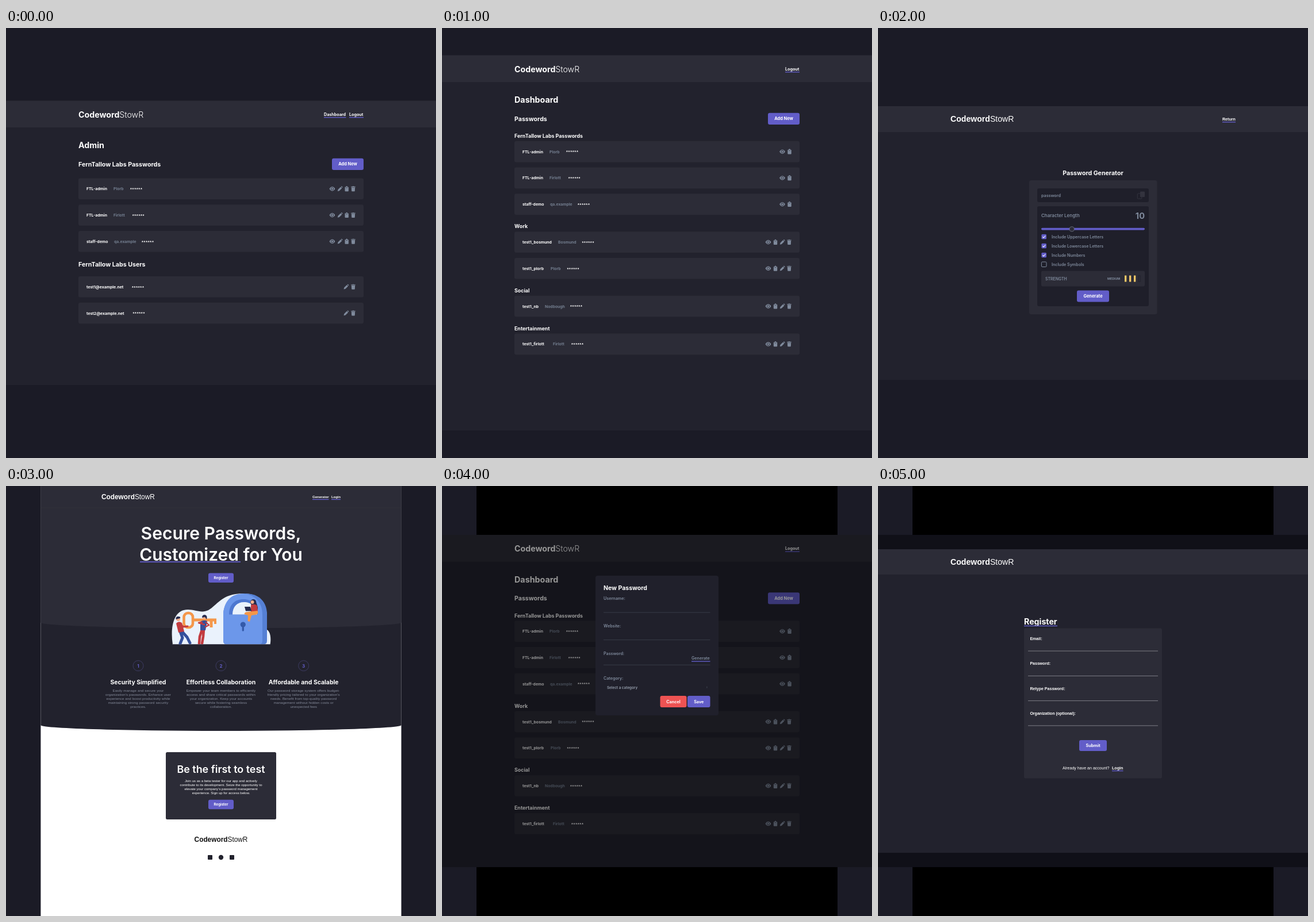
An HTML page for the animation above (6000 ms loop, 748 by 748 pixels).

```html
<!DOCTYPE html>
<html lang="en">
<head>
<meta charset="utf-8">
<title>Password manager tour</title>
<style>
  html, body { margin: 0; width: 100%; height: 100%; overflow: hidden; background: #1b1b26; }
  svg { display: block; width: 100%; height: 100%; }
  text { font-family: Inter, "Open Sans", sans-serif; font-weight: 700; fill: #fff; white-space: pre; }
  .arial { font-family: "Liberation Sans", Arial, sans-serif; }
  .thin { font-weight: 300; }
  .plain { font-weight: 400; }
  .semi { font-weight: 600; }
  .mid { text-anchor: middle; }
  .end { text-anchor: end; }
  .stars { letter-spacing: .7px; }
</style>
</head>
<body>
<svg id="stage" viewBox="0 0 748 748"></svg>
<script>
const OUTER = '#1b1b26', PAGE = '#22222d', PANEL = '#2c2c37', INSET = '#1f1f2a';
const PURPLE = '#625dc8', GRAY = '#7f8a9c';
const SCENE_MS = 1000;
const ORG = 'FernTallow Labs';

const rect = (x, y, w, h, fill, r = 0, extra = '') =>
  `<rect x="${x}" y="${y}" width="${w}" height="${h}" rx="${r}" fill="${fill}" ${extra}/>`;
const circle = (x, y, r, fill, extra = '') =>
  `<circle cx="${x}" cy="${y}" r="${r}" fill="${fill}" ${extra}/>`;
const path = (d, fill, extra = '') => `<path d="${d}" fill="${fill}" ${extra}/>`;
const text = (x, y, size, str, cls = '', fill = '#fff') =>
  `<text x="${x}" y="${y}" font-size="${size}" class="${cls}" style="fill:${fill}">${str}</text>`;
const move = (x, y, body) => `<g transform="translate(${x} ${y})">${body}</g>`;
const hline = (x1, x2, y, color, w = 1) => rect(x1, y - w / 2, x2 - x1, w, color);
const lines = (x, y, step, size, rows, cls, fill) =>
  rows.map((s, i) => text(x, y + i * step, size, s, cls, fill)).join('');

const logo = (x, y, size, cls = '', fill = '#fff') =>
  text(x, y, size, `Codeword<tspan class="${cls.includes('arial') ? 'plain' : 'thin'}">StowR</tspan>`, cls, fill);

function button(x, y, w, h, label, size = 7.4, fill = PURPLE) {
  return rect(x, y, w, h, fill, 3) + text(x + w / 2, y + h / 2 + size * 0.36, size, label, 'mid');
}

function link(x, w, y, label, size, cls = '', gap = 3) {
  return text(x, y, size, label, cls) + hline(x, x + w, y + gap, PURPLE, 1.4);
}

function page(top, headH, end) {
  return rect(0, top, 748, end - top, PAGE) + rect(0, top, 748, headH, PANEL);
}

const icons = {
  eye: path('M-4.9 0C-3.5-2.6-1.8-3.7 0-3.7S3.5-2.6 4.9 0C3.5 2.6 1.8 3.7 0 3.7S-3.5 2.6-4.9 0Z', GRAY) +
    circle(0, 0, 2.5, PANEL) + circle(0, 0, 1.7, GRAY),
  pen: path('M-4.2 4.2L-3.5 1.2 1.1-3.4 3.4-1.1-1.2 3.5ZM1.7-4L2.5-4.5Q3.1-4.7 3.6-4.2L4.2-3.6Q4.7-3.1 4.5-2.5L4-1.7Z', GRAY),
  clip: rect(-3.2, -3.3, 6.4, 7.7, GRAY, 1) + circle(0, -3.4, 1.4, GRAY) + rect(-1.6, -2.2, 3.2, 0.6, PANEL),
  bin: rect(-3.8, -4.1, 7.6, 1.2, GRAY, 0.4) + rect(-1.3, -4.6, 2.6, 1, GRAY) +
    path('M-3.2-2.4H3.2L2.8 3.7Q2.7 4.4 2 4.4H-2Q-2.7 4.4-2.8 3.7Z', GRAY)
};

// One credentials row; set holds pairs such as "eye 567.5"
function row(y, user, site, siteX, starX, set) {
  return rect(126, y - 18.3, 496, 36.6, PANEL, 3) +
    text(140, y + 2.5, 6.85, user) +
    (site ? text(siteX, y + 2.5, 6.8, site, '', '#747f90') : '') +
    text(starX, y + 3.2, 7.4, '******', 'arial stars') +
    set.map(s => s.split(' ')).map(([name, x]) => move(x, y, icons[name])).join('');
}

const shared = [['FTL-admin', 'Plorb', 187, 216], ['FTL-admin', 'Firlott', 187, 219.7], ['staff-demo', 'qa.example', 188, 236]];
const viewSet = ['eye 592', 'clip 604.5'];
const ownSet = ['eye 567.5', 'clip 580', 'pen 592', 'bin 604'];
const adminSet = ['eye 567.5', 'pen 581', 'clip 592.7', 'bin 604'];

function admin() {
  return page(126.5, 46.5, 621) + logo(126, 155.5, 14.2) +
    link(553, 38.5, 152.6, 'Dashboard', 7.15) + link(597, 25, 152.6, 'Logout', 7.15) +
    text(126, 209.3, 14.2, 'Admin') +
    text(126, 241, 10.65, ORG + ' Passwords') + button(567, 226.7, 55, 20.2, 'Add New') +
    shared.map((r, i) => row(279.8 + i * 45.75, ...r, adminSet)).join('') +
    text(126, 414.8, 10.65, ORG + ' Users') +
    row(450.3, 'test1@example.net', '', 0, 219, ['pen 591.7', 'bin 604']) +
    row(496, 'test2@example.net', '', 0, 220.5, ['pen 591.7', 'bin 604']);
}

function dashboard(top, end) {
  return page(top, 46.5, end) + move(0, top,
    logo(126, 29, 14.2) + link(597, 25, 26.1, 'Logout', 7.15) +
    text(126, 82.8, 14.3, 'Dashboard') +
    text(126, 114.4, 10.6, 'Passwords') + button(567, 100.2, 55, 20.2, 'Add New') +
    text(126, 143.6, 8.85, ORG + ' Passwords') +
    shared.map((r, i) => row(167.6 + i * 45.75, ...r, viewSet)).join('') +
    text(126, 300.8, 8.85, 'Work') +
    row(325, 'test1_bosmund', 'Bosmund', 202, 243.5, ownSet) +
    row(370.8, 'test1_plorb', 'Plorb', 189, 217.5, ownSet) +
    text(126, 412.3, 8.85, 'Social') +
    row(436.5, 'test1_nb', 'Nodbough', 179, 223, ownSet) +
    text(126, 478.2, 8.85, 'Entertainment') +
    row(502.4, 'test1_firlott', 'Firlott', 193, 225, ownSet));
}

function generator() {
  const box = (label, y, on) => rect(284.4, y - 4.3, 8.6, 8.6, on ? PURPLE : 'none', 1.5, on ? '' : `stroke="${GRAY}"`) +
    (on ? path(`M286.4 ${y + 0.2}l1.7 1.7 3.1-3.4`, 'none', 'stroke="#fff" stroke-width="1.1"') : '') +
    text(302, y + 2.7, 7.1, label, 'semi', GRAY);
  return page(136, 45, 612) + logo(126, 163.3, 14.1, 'arial') +
    link(599, 23, 160.6, 'Return', 7.1, 'arial') +
    text(374, 255.8, 10.6, 'Password Generator', 'mid') +
    rect(263, 265, 222.5, 233, PANEL, 3.5) +
    rect(277, 279, 194, 24, INSET, 3) + rect(277, 310, 194, 174, INSET, 3) +
    text(284, 294, 7.15, 'password', 'semi', GRAY) +
    rect(456, 284.5, 8, 9.5, '#33333e', 1) + rect(451.3, 288, 7.5, 9, 'none', 1, 'stroke="#33333e"') +
    text(284, 329, 7.95, 'Character Length', 'semi', GRAY) +
    text(464, 331.7, 14.6, '10', 'end', GRAY) +
    rect(284, 347.8, 180, 3.6, PURPLE, 1.8) +
    circle(337.2, 349.8, 4.1, PANEL, 'stroke="#6d7280" stroke-width=".9"') +
    box('Include Uppercase Letters', 363, true) + box('Include Lowercase Letters', 379, true) +
    box('Include Numbers', 395, true) + box('Include Symbols', 411.2, false) +
    rect(284, 422.5, 180, 27, PANEL, 3) +
    text(291, 439, 6.95, 'STRENGTH', 'semi', GRAY) + text(399, 438, 5.3, 'MEDIUM', '', GRAY) +
    [429, 437, 445].map(x => rect(x, 430.5, 3.3, 11, '#f2c766')).join('') +
    rect(453.3, 430.8, 3, 10.4, 'none', 0, `stroke="${INSET}" stroke-width=".7"`) +
    button(346, 456.5, 56, 20, 'Generate');
}

function artwork() {
  const limb = (d, color, w) => path(d, 'none',
    `stroke="${color}" stroke-width="${w}" stroke-linecap="round" stroke-linejoin="round"`);
  const skin = '#f3b08c', hair = '#272b4d', red = '#c23b3f', navy = '#34509b', orange = '#f4974a';
  return path('M290 275.5C286 250 290 221 309 216C325 212 338 223 352 216C367 208 375 187 412 187C444 187 452 204 454 224V250C461 254 461 268 459.5 275.5Z', '#eaf2fc') +
    // padlock
    path('M384 275.5Q378 275.5 378 269V221C380 199 396 187 416 187C440 187 454 201 454 224V269Q454 275.5 448 275.5Z', '#5580d4') +
    path('M384 275.5Q378 275.5 378 269V221C380 199 393 187.5 411 187.5C433 187.5 446 203 446 224V269Q446 275.5 440 275.5Z', '#6c97ea') +
    path('M388 223.5C388 206 398 197 413 197S438 206 438 223.5Z', '#4d77d0') +
    path('M394 223.5C394 210 402 202 414 202S437 210 437 223.5Z', '#eaf2fc') +
    circle(412.3, 241, 4.6, '#345aa9') + rect(410.7, 243, 3.2, 9.5, '#345aa9', 1) +
    // woman with laptop
    path('M425 203C425 196 434 195 435 201C436 207 440 211 437 216L429 212Z', hair) +
    circle(428.5, 202, 3, skin) +
    path('M426 207Q432 204 437 208L438 219H426Z', red) +
    path('M437.5 217Q440 223 434 224L427 225 424 236 420.5 235 421 225 414.5 223Q415 219 420 219Z', orange) +
    path('M415 210H425L427 217.5H417Z', hair) +
    // key
    rect(309.5, 221, 15.5, 25, 'none', 7, `stroke="${orange}" stroke-width="4.6"`) +
    path('M327 230.5H366V240H362V235.5H359.5V246H354.5V235.5H327Z', orange) +
    // left carrier
    limb('M303 253L307 264L303 274M306 253L315 263L320 273', navy, 5) +
    path('M296 239Q300 234 306 238L310 253L300 255Z', red) +
    limb('M304 240L308 245L316 244', red, 3) +
    circle(299.5, 231.5, 3.5, skin) + path('M295.5 232Q295 226.5 300 227Q304 227 303 230Z', hair) +
    // right carrier
    limb('M341 250L337 262L336 274M344 250L343 262L341 274', red, 4.5) +
    path('M338 236Q344 232 350 235L347 251H338Z', navy) +
    limb('M341 237L335 238L345 241M348 237L353 242L347 245', red, 2.4) +
    circle(345, 228.5, 3.2, skin) + path('M341 229Q341 224 346 224Q351 225 349 232L346 228Z', hair) +
    hline(289, 460, 275.6, '#4b4d60', 0.8);
}

function landing() {
  const steps = [
    [230, 'Security Simplified', ['Easily manage and secure your', 'organization\'s passwords. Enhance user',
      'experience and boost productivity while', 'maintaining strong password security', 'practices.']],
    [374, 'Effortless Collaboration', ['Empower your team members to efficiently', 'access and share critical passwords within',
      'your organization. Keep your accounts', 'secure while fostering seamless', 'collaboration.']],
    [517.7, 'Affordable and Scalable', ['Our password storage system offers budget-', 'friendly pricing tailored to your organization\'s',
      'needs. Benefit from top-quality password', 'management without hidden costs or', 'unexpected fees']]
  ];
  const left = 60.4, right = 687.6;
  const bowl = (y, fill) => path(`M${left} 0H${right}V${y}A313.6 10 0 0 1 ${left} ${y}Z`, fill);
  return rect(left, 0, right - left, 748, '#fff') + bowl(416, PAGE) + bowl(237.5, PANEL) +
    hline(left, right, 38, '#33333e', 0.6) +
    logo(166, 23.3, 11.85, 'arial') +
    link(533, 28.5, 20.8, 'Generator', 6, 'arial', 2.6) + link(566, 16, 20.8, 'Login', 5.9, 'arial', 2.6) +
    text(374, 92.5, 30.1, 'Secure Passwords,', 'mid semi') +
    text(374, 129.8, 29.9, 'Customized for You', 'mid semi') + hline(233, 408, 132, PURPLE, 1.8) +
    button(352, 151.5, 44, 16.5, 'Register', 6.15) + artwork() +
    steps.map(([x, head, rows], i) =>
      circle(x, 312.7, 9, 'none', 'stroke="#403e68" stroke-width=".9"') +
      text(x, 315.6, 8, i + 1, 'mid', PURPLE) + text(x, 344.8, 10.45, head, 'mid') +
      `<g letter-spacing=".08">${lines(x, 358.2, 6.9, 6.2, rows, 'arial plain mid', '#858b9a')}</g>`).join('') +
    rect(278, 463, 192, 117, PANEL, 2.5) +
    text(374, 499.2, 17.9, 'Be the first to test', 'mid semi') +
    lines(374, 515, 6.9, 6, ['Join us as a beta tester for our app and actively', 'contribute to its development. Seize the opportunity to',
      'elevate your company\'s password management', 'experience. Sign up for access below.'], 'arial plain mid') +
    button(352, 545.7, 44, 16.5, 'Register', 6.15) +
    logo(374, 619, 11.85, 'arial mid', '#111') +
    rect(351, 642, 8, 8, PAGE, 1) + circle(374, 646, 4.2, PAGE) + rect(389, 642, 8, 8, PAGE, 1);
}

const letterbox = () => rect(60, 0, 628, 85, '#000') + rect(60, 663, 628, 85, '#000');

function newPassword() {
  const field = (label, y) => text(281, y, 7.15, label, 'semi', GRAY);
  return letterbox() + dashboard(85, 663) + rect(0, 85, 748, 578, '#000', 0, 'opacity=".41"') +
    rect(267, 156, 214, 243, '#20202b', 4) + text(281, 181, 10.5, 'New Password') +
    field('Username:', 198.2) + field('Website:', 246) + field('Password:', 293.5) + field('Category:', 337.3) +
    [220, 267.7, 311.2].map(y => hline(281, 466.5, y, '#3d424e', 0.8)).join('') +
    text(434, 302.4, 7.15, 'Generate', 'semi', GRAY) + hline(434, 466.5, 305, PURPLE, 1.4) +
    text(287, 352.6, 6.3, 'Select a category', 'semi', '#98a1af') +
    rect(460.5, 348.6, 0.8, 3, '#4a4f5d') +
    button(379.5, 365, 46, 20, 'Cancel', 7.2, '#ee5353') + button(427, 365, 39.5, 20, 'Save', 7.2);
}

function register() {
  const labels = ['Email:', 'Password:', 'Retype Password:', 'Organization (optional):'];
  return letterbox() + rect(0, 85, 748, 578, '#101018') +
    page(110, 44, 638) + logo(126, 137.2, 14.1, 'arial') +
    text(254, 240.8, 14.2, 'Register') + hline(254, 312, 243.4, PURPLE, 1.5) +
    rect(254, 247.5, 240, 261, PANEL, 3) +
    labels.map((s, i) => text(264.4, 268 + i * 43.3, 7.05, s, 'arial') +
      hline(261, 487, 287 + i * 43.3, '#85858d', 0.9)).join('') +
    button(350, 442, 48, 19, 'Submit', 7.3) +
    text(321, 492.5, 7.05, 'Already have an account?', 'arial plain') +
    link(407, 19.5, 492.5, 'Login', 7.1, 'arial');
}

const scenes = [admin(), dashboard(47.5, 700), generator(), landing(), newPassword(), register()];
const stage = document.getElementById('stage');
stage.innerHTML = rect(0, 0, 748, 748, OUTER) + scenes.map(s => `<g class="scene">${s}</g>`).join('');
const groups = [...stage.querySelectorAll('.scene')];
const start = performance.now();

function update(now) {
  const current = Math.floor(Math.max(0, now - start) / SCENE_MS) % groups.length;
  groups.forEach((g, i) => g.setAttribute('display', i === current ? 'inline' : 'none'));
  requestAnimationFrame(update);
}
update(start);
</script>
</body>
</html>
```
